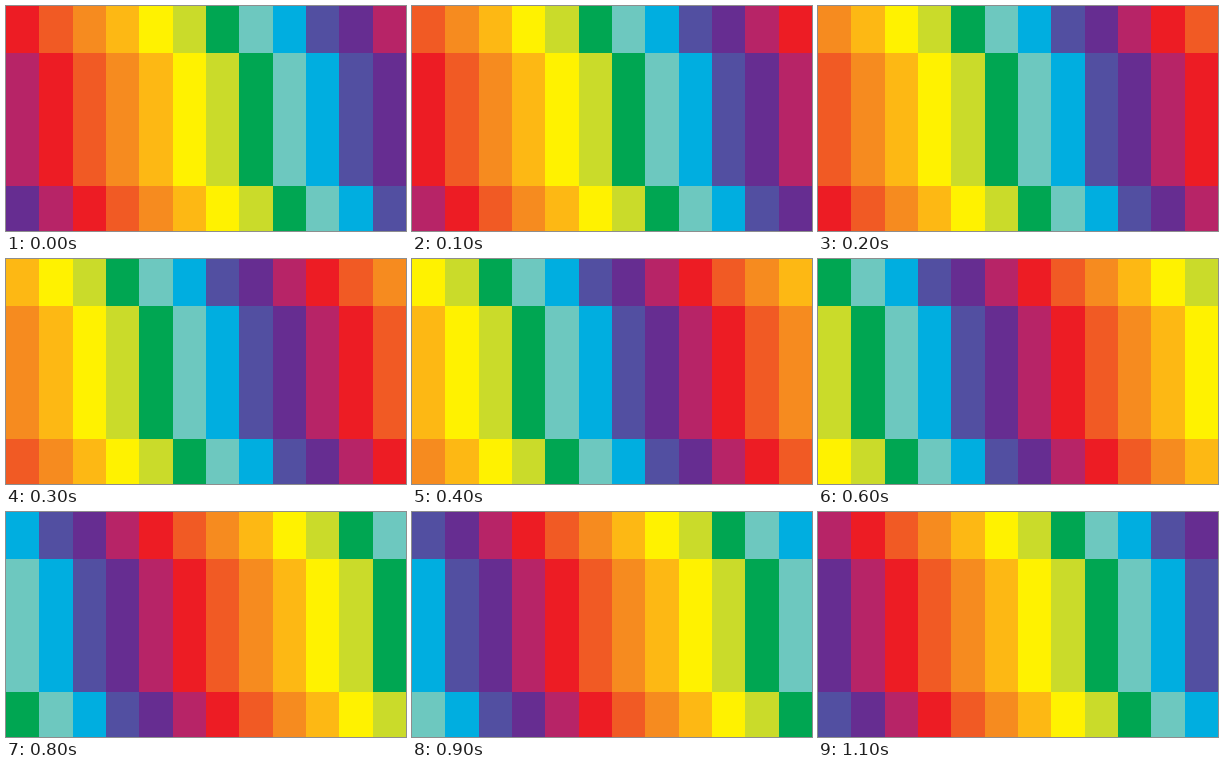
Animation, 400 px wide and 225 px high, one loop 1.2 s. Source, as an HTML page:

```html
<!DOCTYPE html>
<html lang="en">
<head>
<meta charset="utf-8">
<title>Colour columns</title>
<style>
  html, body { margin: 0; width: 100%; height: 100%; overflow: hidden; }
  #stage {
    display: grid;
    width: 400px;
    height: 225px;
    grid-template-columns: repeat(12, 1fr);
    grid-template-rows: 47px 133px 45px;
  }
  #stage div { animation: spectrum 1200ms step-end infinite; }
  @keyframes spectrum {
    0%      { background-color: #ed1c24; }
    8.333%  { background-color: #f15a24; }
    16.666% { background-color: #f68b1f; }
    25%     { background-color: #fdb814; }
    33.333% { background-color: #fff200; }
    41.666% { background-color: #cadb2a; }
    50%     { background-color: #00a652; }
    58.333% { background-color: #6dc8bf; }
    66.666% { background-color: #00aee0; }
    75%     { background-color: #524fa1; }
    83.333% { background-color: #662d91; }
    91.666% { background-color: #b72467; }
    100%    { background-color: #ed1c24; }
  }
</style>
</head>
<body>
<div id="stage"></div>
<script>
  const COLUMNS = 12, ROWS = 3, STEP = 100;
  const stage = document.getElementById('stage');

  // Each row runs one colour behind the row above it.
  for (let row = 0; row < ROWS; row++) {
    for (let col = 0; col < COLUMNS; col++) {
      const cell = document.createElement('div');
      const phase = (col - row + COLUMNS) % COLUMNS;
      cell.style.animationDelay = `${-phase * STEP}ms`;
      stage.append(cell);
    }
  }
</script>
</body>
</html>
```
